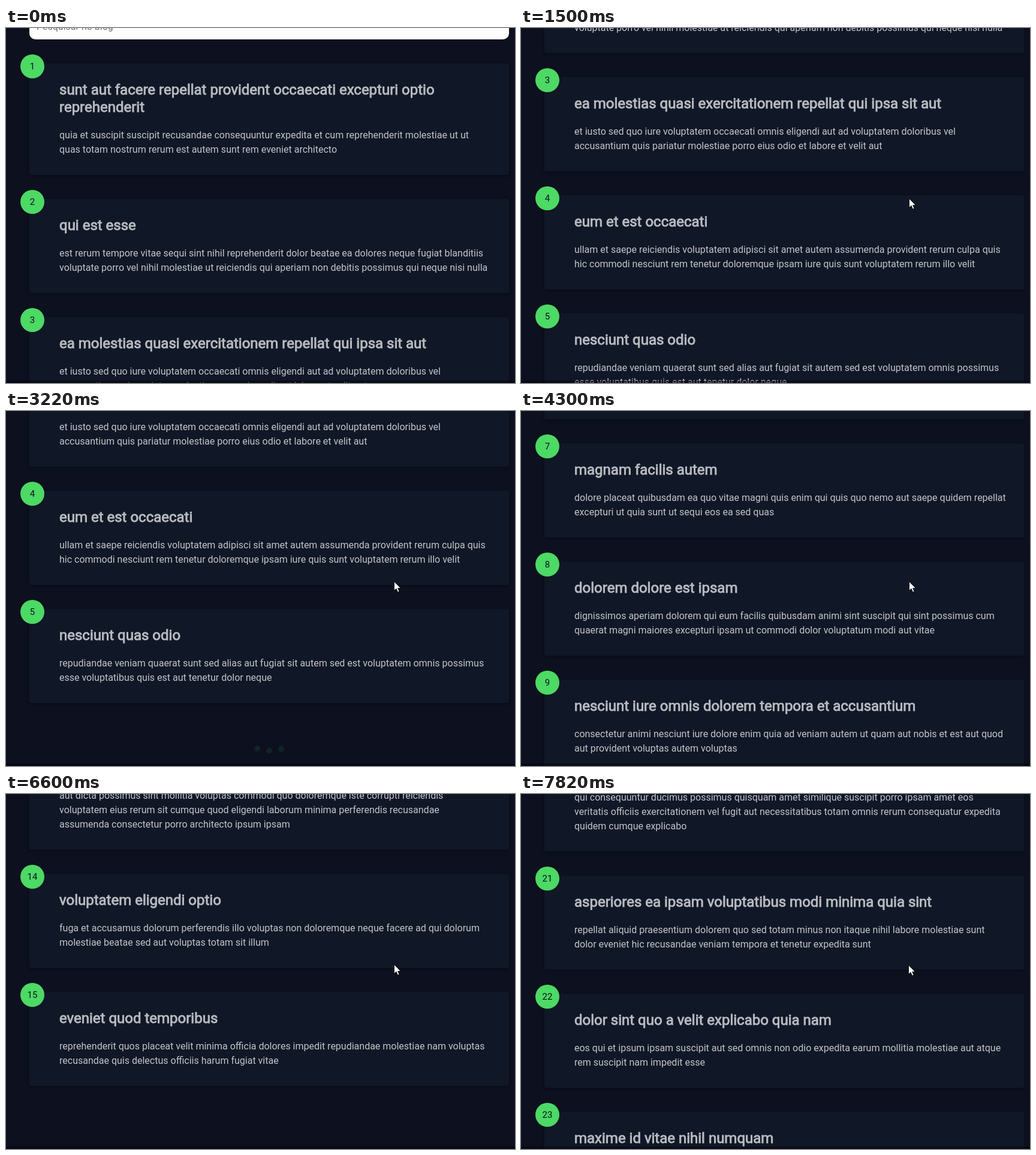
Recreate the animation shown at these times as an HTML page. Size 849x592 px, loop 8 s.

```html
<!DOCTYPE html>
<html lang="pt">
<head>
<meta charset="utf-8">
<style>
html, body { margin: 0; width: 100%; height: 100%; overflow: hidden; background: #0d101e; }
body { position: relative; font: 16px/24px Roboto, sans-serif; color: #c2c5ca; }
#page { position: absolute; left: 39px; top: -24px; width: 800px; }
.search { box-sizing: border-box; height: 43px; padding: 12px; border-radius: 10px; background: #fff; color: #757575; line-height: 19px; }
.post { position: relative; margin-top: 40px; padding: 30px 30px 30px 50px; border-radius: 3px; background: #101726; box-shadow: 0 2px 4px rgba(0, 0, 0, .3); white-space: pre; }
.number { position: absolute; left: -15px; top: -15px; width: 40px; height: 40px; border-radius: 50%; background: #4cd964; color: #0d101e; font-size: 15px; line-height: 40px; text-align: center; }
.title { font-size: 24px; line-height: 29px; color: #b9bcc1; -webkit-text-stroke: .9px #b9bcc1; }
.text { margin-top: 20px; }
.dot { position: absolute; top: 562px; width: 10px; height: 10px; border-radius: 50%; background: #4cd964; }
.edge { position: absolute; left: 0; top: 588px; width: 100%; height: 4px; background: rgba(5, 3, 14, .5); }
#cursor { position: absolute; left: 0; top: 0; }
</style>
</head>
<body>
<div id="page"><div class="search">Pesquisar no blog</div></div>
<div class="dot" style="left:414px"></div>
<div class="dot" style="left:434px"></div>
<div class="dot" style="left:454px"></div>
<div class="edge"></div>
<svg id="cursor" width="14" height="21"><path d="M.5 .5V15.5L4 12.3L6.5 18L9 17L6.6 11.4H11.3Z" fill="#fff" stroke="#000" stroke-width=".8"/></svg>
<script>
// One post per line: title|text, with "/" as line break.
const posts = `sunt aut facere repellat provident occaecati excepturi optio/reprehenderit|quia et suscipit suscipit recusandae consequuntur expedita et cum reprehenderit molestiae ut ut/quas totam nostrum rerum est autem sunt rem eveniet architecto
qui est esse|est rerum tempore vitae sequi sint nihil reprehenderit dolor beatae ea dolores neque fugiat blanditiis/voluptate porro vel nihil molestiae ut reiciendis qui aperiam non debitis possimus qui neque nisi nulla
ea molestias quasi exercitationem repellat qui ipsa sit aut|et iusto sed quo iure voluptatem occaecati omnis eligendi aut ad voluptatem doloribus vel/accusantium quis pariatur molestiae porro eius odio et labore et velit aut
eum et est occaecati|ullam et saepe reiciendis voluptatem adipisci sit amet autem assumenda provident rerum culpa quis/hic commodi nesciunt rem tenetur doloremque ipsam iure quis sunt voluptatem rerum illo velit
nesciunt quas odio|repudiandae veniam quaerat sunt sed alias aut fugiat sit autem sed est voluptatem omnis possimus/esse voluptatibus quis est aut tenetur dolor neque
dolorem eum magni eos aperiam quia|ut aspernatur corporis harum nihil quis provident sequi mollitia nobis aliquid molestiae/perspiciatis et ea nemo ab reprehenderit accusantium quas voluptate dolores velit et et/doloremque molestiae
magnam facilis autem|dolore placeat quibusdam ea quo vitae magni quis enim qui quis quo nemo aut saepe quidem repellat/excepturi ut quia sunt ut sequi eos ea sed quas
dolorem dolore est ipsam|dignissimos aperiam dolorem qui eum facilis quibusdam animi sint suscipit qui sint possimus cum/quaerat magni maiores excepturi ipsam ut commodi dolor voluptatum modi aut vitae
nesciunt iure omnis dolorem tempora et accusantium|consectetur animi nesciunt iure dolore enim quia ad veniam autem ut quam aut nobis et est aut quod/aut provident voluptas autem voluptas
optio molestias id quia eum|quo et expedita modi cum officia vel magni doloribus qui repudiandae vero nisi sit quos veniam/quod sed accusamus veritatis error
et ea vero quia laudantium autem|delectus reiciendis molestiae occaecati non minima eveniet qui voluptatibus accusamus in/eum beatae sit vel qui neque voluptates ut commodi qui incidunt ut animi commodi
in quibusdam tempore odit est dolorem|itaque id aut magnam praesentium quia et ea odit et ea voluptas et sapiente quia nihil amet occaecati/quia id voluptatem incidunt ea est distinctio odio
dolorum ut in voluptas mollitia et saepe quo animi|aut dicta possimus sint mollitia voluptas commodi quo doloremque iste corrupti reiciendis/voluptatem eius rerum sit cumque quod eligendi laborum minima perferendis recusandae/assumenda consectetur porro architecto ipsum ipsam
voluptatem eligendi optio|fuga et accusamus dolorum perferendis illo voluptas non doloremque neque facere ad qui dolorum/molestiae beatae sed aut voluptas totam sit illum
eveniet quod temporibus|reprehenderit quos placeat velit minima officia dolores impedit repudiandae molestiae nam voluptas/recusandae quis delectus officiis harum fugiat vitae
sint suscipit perspiciatis velit dolorum rerum ipsa laboriosam/odio|suscipit nam nisi quo aperiam aut asperiores eos fugit maiores voluptatibus quia/voluptatem quis ullam qui in alias quia est consequatur magni mollitia accusamus ea nisi/voluptate dicta
fugit voluptas sed molestias voluptatem provident|eos voluptas et aut odit natus earum aspernatur fuga molestiae ullam deserunt ratione qui eos/qui nihil ratione nemo velit ut aut id quo
voluptate et itaque vero tempora molestiae|eveniet quo quis laborum totam consequatur non dolor ut et est repudiandae est voluptatem vel/debitis et magnam
adipisci placeat illum aut reiciendis qui|illum quis cupiditate provident sit magnam ea sed aut omnis veniam maiores ullam consequatur/atque adipisci quo iste expedita sit quos voluptas
doloribus ad provident suscipit at|qui consequuntur ducimus possimus quisquam amet similique suscipit porro ipsam amet eos/veritatis officiis exercitationem vel fugit aut necessitatibus totam omnis rerum consequatur expedita/quidem cumque explicabo
asperiores ea ipsam voluptatibus modi minima quia sint|repellat aliquid praesentium dolorem quo sed totam minus non itaque nihil labore molestiae sunt/dolor eveniet hic recusandae veniam tempora et tenetur expedita sunt
dolor sint quo a velit explicabo quia nam|eos qui et ipsum ipsam suscipit aut sed omnis non odio expedita earum mollitia molestiae aut atque/rem suscipit nam impedit esse
maxime id vitae nihil numquam|veniam voluptatum quae adipisci id et id quia eos ad et dolorem aliquam quo nisi sunt eos impedit/error ad similique veniam`;

const page = document.getElementById('page');
const cursor = document.getElementById('cursor');
const dots = [...document.querySelectorAll('.dot')];

function add(parent, className, text = '') {
  const el = parent.appendChild(document.createElement('div'));
  el.className = className;
  el.textContent = text.replaceAll('/', '\n');
  return el;
}

const cards = posts.split('\n').map((line, i) => {
  const [title, text] = line.split('|');
  const card = add(page, 'post');
  add(card, 'number', String(i + 1));
  add(card, 'title', title);
  add(card, 'text', text);
  return card;
});

const LOOP = 8000;
const STEP = 70;
// Spans of movement; the picture advances in steps of about 70 ms and rests in between
const spans = [
  [0, 0], [120, 540], [740, 950], [1210, 1500], [1700, 2450], [2520, 3220], [3560, 3560], [3820, 4030],
  [4230, 4440], [4640, 4850], [5050, 5820], [5890, 6600], [6870, 6870], [7200, 7410], [7610, 7820]
];
// Wheel flicks: start, scroll position reached
const FLICK = 240;
const flicks = [
  [705, 200], [1200, 400], [1675, 546],
  [3785, 1055], [4202, 1564], [4605, 2070], [4982, 2564],
  [7165, 3290], [7575, 4017]
];
const loaderStarts = [1938, 5270];

const clamp = x => Math.min(1, Math.max(0, x));
const smooth = x => x * x * (3 - 2 * x);
const easeIn = x => clamp(x) ** 1.67;

function stepped(t) {
  const [start, end] = spans.findLast(span => span[0] <= t);
  if (start === end) return start;
  const step = (end - start) / Math.round((end - start) / STEP);
  return Math.min(end, start + step * Math.floor((t - start) / step));
}

function scrollAt(t) {
  let y = 0;
  for (const [start, target] of flicks)
    y += (target - y) * smooth(clamp((t - start) / FLICK));
  return Math.round(y);
}

function loaderOpacity(t) {
  return Math.max(...loaderStarts.map(s => easeIn((t - s) / 300) - easeIn((t - s - 1000) / 300)));
}

function bounce(t) {
  const phase = (t % 500) / 250;
  return phase < 1 ? easeIn(phase) : 1 - easeIn(phase - 1);
}

function draw(t) {
  page.style.transform = `translateY(${-scrollAt(t)}px)`;
  const loaded = t < 3560 ? 5 : t < 6870 ? 15 : cards.length;
  cards.forEach((card, i) => card.style.visibility = i < loaded ? 'visible' : 'hidden');

  const opacity = loaderOpacity(t);
  dots.forEach((dot, i) => {
    dot.style.opacity = opacity;
    dot.style.transform = `translateY(${-10 * bounce(t + 425 - 100 * i)}px)`;
  });

  const left = (1 - clamp((t - 90) / 450)) ** 2;
  const nudge = t >= 7200 ? 1 : 0;
  cursor.style.visibility = t < 120 ? 'hidden' : 'visible';
  cursor.style.transform =
    `translate(${Math.round(647 + 176 * left) - nudge}px, ${Math.round(284 + 330 * left) + nudge}px)`;
}

function frame() {
  draw(stepped(performance.now() % LOOP));
  requestAnimationFrame(frame);
}
frame();
</script>
</body>
</html>
```
